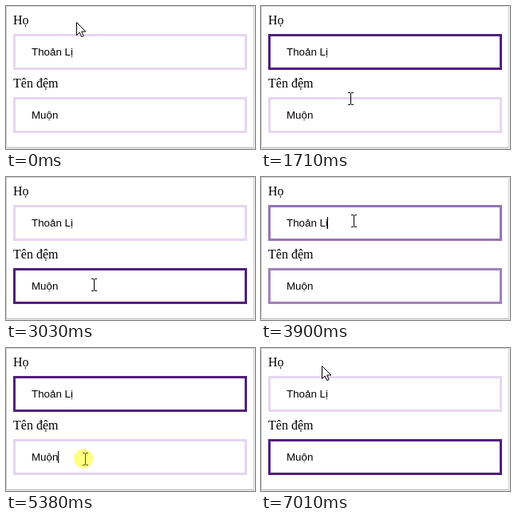
Recreate the animation shown at these times as an HTML page. Size 312x179 px, loop 7060 ms.

```html
<!DOCTYPE html>
<html lang="vi">
<head>
<meta charset="utf-8">
<title>Hiệu ứng viền ô nhập</title>
<style>
  html, body { margin: 0; width: 100%; height: 100%; overflow: hidden; background: #fff; }
  svg { display: block; width: 312px; height: 179px; }
  .label { font: 16px "Liberation Serif", "Times New Roman", serif; }
  .value { font: 13.333px "Liberation Sans", Arial, sans-serif; }
</style>
</head>
<body>
<svg viewBox="0 0 312 179">
  <rect width="312" height="179" fill="#f4f4f4"/>
  <rect x=".5" y=".5" width="310" height="177" fill="#fff" stroke="#cfcfcf"/>
  <path d="M1 177.5H311" stroke="#b4b4b4"/>

  <text class="label" x="9" y="23">Họ</text>
  <rect class="field" x="10.5" y="36.5" width="290" height="42" fill="#fff" stroke-width="3"/>
  <text class="value" x="32" y="62">Thoản Lị</text>
  <rect class="caret" x="83" y="50" width="1" height="15"/>

  <text class="label" x="9" y="102">Tên đệm</text>
  <rect class="field" x="10.5" y="115.5" width="290" height="42" fill="#fff" stroke-width="3"/>
  <text class="value" x="32" y="141">Muộn</text>
  <rect class="caret" x="65" y="129" width="1" height="15"/>

  <g id="cursor">
    <circle id="halo" cx="-2" cy="-.5" r="12" fill="#ffff80"/>
    <path id="arrow" d="M.5 .5V16.5L4.2 13 6.8 18.6 9.2 17.5 6.7 12H11.8Z" fill="#fff" stroke="#000"/>
    <path id="beam" d="M-3 -7.5H0M1 -7.5H4M-3 7.5H0M1 7.5H4M.5 -7V7" fill="none" stroke="#000"/>
  </g>
</svg>
<script>
const LOOP = 7060, FADE = 500, BLINK = 530;
const LIGHT = [231, 214, 242], DARK = [82, 31, 126];

// Each click focuses one field; the halo marks the pressed button.
const clicks = [
  { field: 0, focus: 830, seen: 885, halo: [885, 965] },
  { field: 1, focus: 2040, seen: 2040, halo: [2015, 2095] },
  { field: 0, focus: 3745, seen: 3825, halo: [3825, 3895] },
  { field: 1, focus: 5370, seen: 5370, halo: [5370, 5455] }
];

// Pointer hot spot: time, x, y
const path = [
  [0, 88, 20], [30, 88, 20], [460, 111, 49],
  [1220, 111, 49], [1950, 113, 139],
  [2990, 113, 139], [3030, 110, 135], [3600, 116, 50], [3730, 116, 55],
  [4540, 116, 55], [5130, 99, 139],
  [6240, 99, 139], [6910, 76, 22], [LOOP, 76, 22]
];

const $ = id => document.getElementById(id);
const fields = [...document.querySelectorAll(".field")];
const carets = [...document.querySelectorAll(".caret")];
const [cursor, halo, arrow, beam] = ["cursor", "halo", "arrow", "beam"].map($);

const mix = (a, b, k) => a + (b - a) * k;
const smooth = k => k * k * (3 - 2 * k);
const show = (node, on) => node.setAttribute("visibility", on ? "visible" : "hidden");

// CSS "ease": cubic-bezier(.25, .1, .25, 1)
function ease(x) {
  if (x <= 0 || x >= 1) return x <= 0 ? 0 : 1;
  const bezier = (a, b, s) => 3 * a * s * (1 - s) ** 2 + 3 * b * s * s * (1 - s) + s ** 3;
  let low = 0, high = 1;
  for (let i = 0; i < 20; i++) {
    const mid = (low + high) / 2;
    if (bezier(.25, .25, mid) < x) low = mid; else high = mid;
  }
  return bezier(.1, 1, low);
}

function pointer(t) {
  const i = path.findIndex(p => p[0] > t);
  const [t0, x0, y0] = path[i - 1], [t1, x1, y1] = path[i];
  const k = smooth((t - t0) / (t1 - t0));
  return [Math.round(mix(x0, x1, k)), Math.round(mix(y0, y1, k))];
}

function render(t) {
  const done = clicks.filter(c => t >= c.seen);
  const active = done[done.length - 1];
  const fade = active ? ease((t - active.focus) / FADE) : 0;

  fields.forEach((field, i) => {
    const focused = active && active.field === i;
    const level = focused ? fade : done.length > 1 ? 1 - fade : 0;
    const rgb = LIGHT.map((c, n) => Math.round(mix(c, DARK[n], level)));
    field.setAttribute("stroke", `rgb(${rgb})`);
    const lit = focused && Math.floor((t - active.focus) / BLINK) % 2 === 0;
    show(carets[i], lit);
  });

  const [x, y] = pointer(t);
  const overField = (y >= 35 && y < 80) || (y >= 114 && y < 159);
  const pressed = clicks.some(c => t >= c.halo[0] && t < c.halo[1]);
  cursor.setAttribute("transform", `translate(${x} ${y})`);
  show(arrow, !overField);
  show(beam, overField);
  show(halo, pressed);
  beam.setAttribute("stroke", pressed ? "#55552a" : "#000");
}

const start = performance.now();
function tick() {
  render((performance.now() - start) % LOOP);
  requestAnimationFrame(tick);
}
tick();
</script>
</body>
</html>
```
